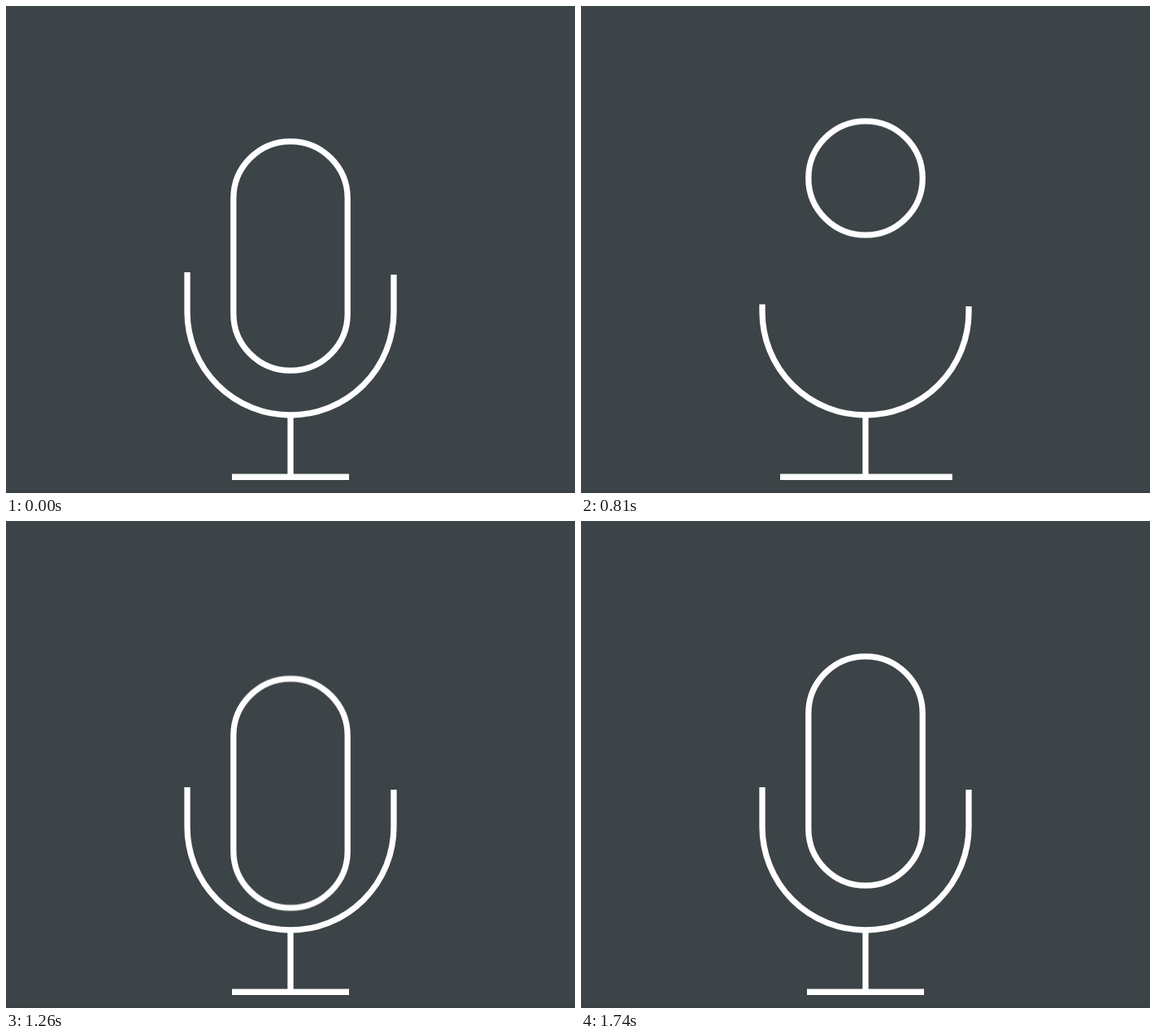
These frames come from a looping animation (700 px wide and 600 px high, 2.79 s). An HTML page without scripts:

```html
<!DOCTYPE html>
<html lang="en">
<head>
<meta charset="utf-8">
<title>Microphone</title>
<style>
  html, body { margin: 0; width: 100%; height: 100%; overflow: hidden; background: #3d4447; }
  svg { display: block; width: 100%; height: 100%; }

  .stroke { fill: none; stroke: #fff; stroke-width: 7.3; }
  .draw { stroke-dasharray: 100 300; }
  .base, .body, .float, .stem, .arm, .stand { animation: 2790ms linear infinite; }
  .base { fill: #fff; animation-name: base; }
  .float { animation-name: float; }
  .body { animation-name: body; }
  .stem { animation-name: stem; }
  .arm { animation-name: arm; }
  .stand { animation-name: dip; }

  /* Every part shows its rest pose for 30 ms (1.075%), then is hidden until it is drawn. */

  /* Line grows from the middle, shrinks to the foot, widens on impact. */
  @keyframes base {
    0% { x: 278px; width: 144px; animation-timing-function: step-end; }
    1.075%, 10.394% { x: 350px; width: 0; animation-timing-function: cubic-bezier(.333, .667, .667, 1); }
    20.072% { x: 168px; width: 370px; animation-timing-function: cubic-bezier(.333, .667, .667, 1); }
    39.964%, 46.237% { x: 278px; width: 144px; animation-timing-function: ease-out; }
    48.925% { x: 268px; width: 164px; animation-timing-function: ease-in-out; }
    54.839% { x: 274px; width: 152px; animation-timing-function: ease-out; }
    59.498%, 100% { x: 278px; width: 144px; }
  }

  @keyframes stem {
    0% { stroke-dashoffset: 0; animation-timing-function: step-end; }
    1.075%, 20.789% { stroke-dashoffset: 102; }
    24.373%, 100% { stroke-dashoffset: 0; }
  }

  @keyframes arm {
    0% { stroke-dashoffset: 0; animation-timing-function: step-end; }
    1.075%, 24.014% { stroke-dashoffset: 102; animation-timing-function: cubic-bezier(.333, .667, .667, 1); }
    32.366%, 46.237% { stroke-dashoffset: 0; animation-timing-function: ease-out; }
    48.925% { stroke-dashoffset: 10; animation-timing-function: ease-in-out; }
    54.839% { stroke-dashoffset: 4.4; animation-timing-function: ease-out; }
    59.498%, 100% { stroke-dashoffset: 0; }
  }

  @keyframes dip {
    0%, 46.237% { transform: translateY(0); animation-timing-function: ease-out; }
    48.925% { transform: translateY(8px); animation-timing-function: ease-in-out; }
    54.839% { transform: translateY(3px); animation-timing-function: ease-out; }
    59.498%, 100% { transform: translateY(0); }
  }

  /* Toss, fall into the cup, rebound, settle. */
  @keyframes float {
    0% { transform: translate(350px, 308px); animation-timing-function: step-end; }
    1.075%, 24.373% { transform: translate(350px, 415px); animation-timing-function: cubic-bezier(.333, .667, .667, 1); }
    36.846% { transform: translate(350px, 83px); animation-timing-function: cubic-bezier(.333, 0, .667, .333); }
    41.219% { transform: translate(350px, 215px); animation-timing-function: cubic-bezier(.333, .667, .667, 1); }
    48.136% { transform: translate(350px, 362px); animation-timing-function: ease-in-out; }
    54.659% { transform: translate(350px, 294.5px); animation-timing-function: ease-in-out; }
    62.366%, 100% { transform: translate(350px, 308px); }
  }

  /* Dot to circle, circle to capsule. */
  @keyframes body {
    0% { x: -70.2px; y: -141.2px; width: 140.4px; height: 282.4px; animation-timing-function: step-end; }
    1.075%, 24.373% { x: 0; y: 0; width: 0; height: 0; animation-timing-function: ease-out; }
    27.957%, 36.846% { x: -70.2px; y: -70.2px; width: 140.4px; height: 140.4px; animation-timing-function: cubic-bezier(.333, 0, .667, .333); }
    41.219%, 100% { x: -70.2px; y: -141.2px; width: 140.4px; height: 282.4px; }
  }
</style>
</head>
<body>
<svg viewBox="0 0 700 600">
  <rect y="598.5" width="700" height="1.5" fill="#394043"/>
  <g class="stand">
    <path class="stroke draw stem" pathLength="100" d="M350 578V504"/>
    <path class="stroke draw arm" pathLength="100" d="M350 504A127 127 0 0 1 223 377V328"/>
    <path class="stroke draw arm" pathLength="100" d="M350 504A127 127 0 0 0 477 377V331"/>
  </g>
  <rect class="base" x="278" y="576.5" width="144" height="7.5"/>
  <g class="float">
    <rect class="stroke body" rx="70.2"/>
  </g>
</svg>
</body>
</html>
```
